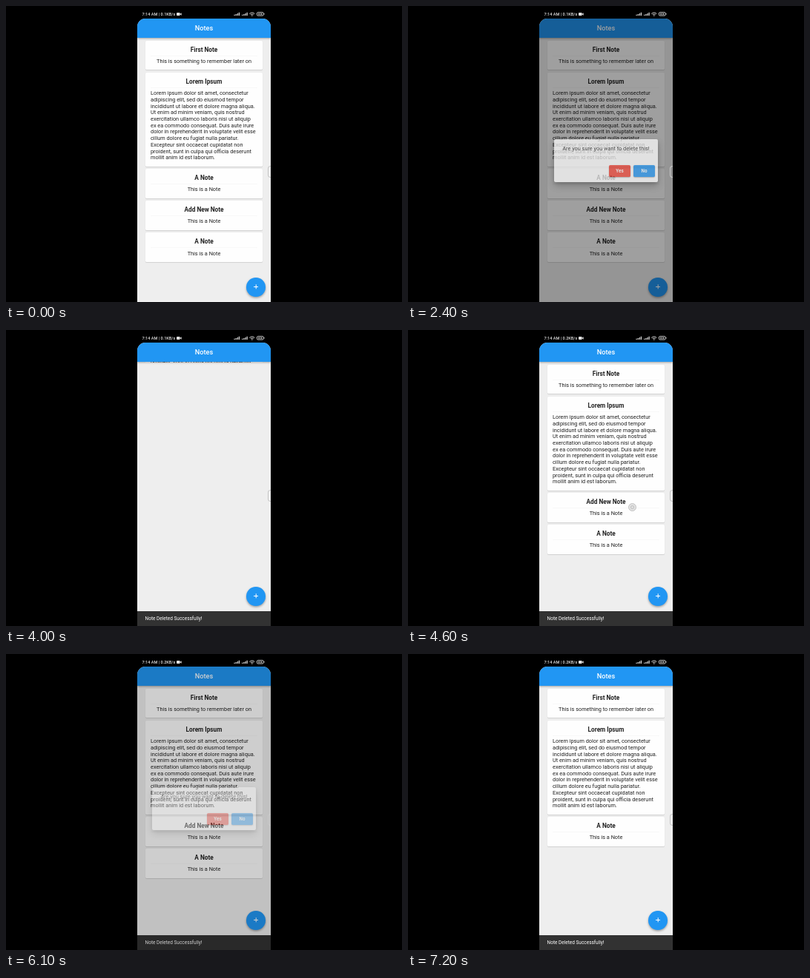
An HTML page that plays this animation: 534 px wide and 400 px high, repeating every 7900 ms.

```html
<!DOCTYPE html>
<html lang="en">
<head>
<meta charset="utf-8">
<title>Notes</title>
<style>
  html, body { margin: 0; width: 100%; height: 100%; overflow: hidden; background: #000; }
  body { position: relative; font: 7.33px/8.7px Roboto, sans-serif; color: #212121; white-space: nowrap; }
  body * { box-sizing: border-box; }
  .abs, .phone > *, .popup > *, .dot { position: absolute; }

  /* Every animation shares one 7900 ms loop */
  .list, .snack, .snack span, .fab, .fade, .dot, .before, .after, .gone { animation: 7900ms linear infinite; }

  .status { left: 183.5px; top: 7.2px; display: flex; white-space: pre; font-size: 5.55px; line-height: 8px; font-weight: 500; color: #e4e4e4; }
  .before { animation-name: before; }
  .after { position: absolute; right: 0; animation-name: after; }
  .icons { left: 0; top: 0; }

  .phone { position: absolute; left: 177px; top: 17px; width: 180px; height: 383px; overflow: hidden; border-radius: 11px 11px 0 0; background: #eee; }
  .bar { left: 0; top: 0; width: 180px; height: 26px; background: #2196f3; box-shadow: 0 1px 2.5px rgba(0,0,0,.32); color: #fff; font: 500 9.17px/26.4px Roboto, sans-serif; text-align: center; }

  .list { left: 0; top: 26px; width: 180px; overflow: hidden; display: flex; flex-direction: column; justify-content: center; animation-name: fold; }
  .cards { flex: none; padding-top: 4px; }
  .card { position: relative; width: 158px; margin: 0 0 3.65px 11px; padding: 7.5px 7px 6.6px; background: #fefefe; border-radius: 1.5px; box-shadow: 0 .4px .9px rgba(0,0,0,.22); text-align: center; }
  .card h2 { margin: 0; height: 16.65px; font: 700 8.25px/9.6px Roboto, sans-serif; }
  .card::after { content: ""; position: absolute; left: 7px; right: 7px; top: 20px; height: 1px; background: #f8f8f8; }
  .card p { margin: 0; }
  .card .long { text-align: left; }
  .gone { overflow: hidden; }
  .first { animation-name: drop-first; }
  .second { animation-name: drop-second; }

  .snack { left: 0; top: 363px; width: 180px; height: 20px; padding-left: 10.6px; background: #323232; color: #fff; font-size: 6.48px; line-height: 20.8px; animation-name: rise; }
  .snack span { animation-name: snack-text; }
  .fab { left: 147.2px; top: 330.2px; width: 25.6px; height: 25.6px; border-radius: 50%; background: #2196f3; box-shadow: 0 1.5px 3px rgba(0,0,0,.34); animation-name: rise; }
  .fab::before, .fab::after { content: ""; position: absolute; left: 9.6px; top: 12.3px; width: 6.4px; height: 1px; background: #fff; }
  .fab::after { transform: rotate(90deg); }

  .fade { inset: 0; animation-name: fade; }
  .barrier { background: rgba(0,0,0,.54); }
  .dialog { left: 20px; top: 162.5px; width: 140px; height: 58.3px; border-radius: 2px; background: #fff; box-shadow: 0 5px 11px rgba(0,0,0,.3), 0 2px 4px rgba(0,0,0,.22); text-align: center; padding-top: 9.5px; }
  .btn { top: 198px; width: 29px; height: 16px; border-radius: 1.8px; color: #fff; font: 700 6.3px/16.4px Roboto, sans-serif; text-align: center; box-shadow: 0 .8px 1.5px rgba(0,0,0,.35); }
  .yes { left: 94px; background: #f44336; }
  .no { left: 127px; background: #2196f3; }

  .edge { left: 353px; top: 216px; width: 4px; height: 16px; border: 1px solid #c8c8c8; border-right: 0; border-radius: 4px 0 0 4px; }
  .dot { width: 11px; height: 11px; border-radius: 50%; background: #e2e2e2; border: 1px solid #c2c2c2; }
  .dot::after { content: ""; position: absolute; inset: 2px; border: 1px solid #bcbcbc; border-radius: 50%; }
  .press1 { left: 303px; top: 244px; animation-name: press1; }
  .press2 { left: 297px; top: 234px; animation-name: press2; }

  @keyframes before { 0%, 51.89% { opacity: 1 } 51.9%, 100% { opacity: 0 } }
  @keyframes after { 0%, 51.89% { opacity: 0 } 51.9%, 100% { opacity: 1 } }

  @keyframes fold {
    0%, 44.94% { height: 306.5px; animation-timing-function: cubic-bezier(.4,0,.2,1) }
    51.01% { height: 0; animation-timing-function: cubic-bezier(.4,0,.2,1) }
    54.43%, 81.65% { height: 263.4px; animation-timing-function: cubic-bezier(.4,0,.2,1) }
    87.34% { height: 0; animation-timing-function: cubic-bezier(.4,0,.2,1) }
    91.14%, 100% { height: 220.3px }
  }
  @keyframes drop-first {
    0%, 51% { height: 39.45px; margin-bottom: 3.65px; padding-block: 7.5px 6.6px; visibility: visible }
    51.01%, 100% { height: 0; margin-bottom: 0; padding-block: 0; visibility: hidden }
  }
  @keyframes drop-second {
    0%, 87.33% { height: 39.45px; margin-bottom: 3.65px; padding-block: 7.5px 6.6px; visibility: visible }
    87.34%, 100% { height: 0; margin-bottom: 0; padding-block: 0; visibility: hidden }
  }
  @keyframes rise {
    0%, 31.01% { transform: translateY(20px); animation-timing-function: cubic-bezier(.4,0,.2,1) }
    34.18%, 84.18% { transform: none; animation-timing-function: cubic-bezier(.8,0,.6,1) }
    87.34% { transform: translateY(20px); animation-timing-function: cubic-bezier(.4,0,.2,1) }
    90.51%, 100% { transform: none }
  }
  @keyframes snack-text {
    0%, 32.91% { opacity: 0 }
    35.2%, 84.18% { opacity: 1 }
    87.34%, 88.9% { opacity: 0 }
    90.8%, 100% { opacity: 1 }
  }
  @keyframes fade {
    0%, 15.57% { opacity: 0 }
    16.46% { opacity: .97 }
    17.72%, 29.75% { opacity: 1 }
    30.38% { opacity: .7 }
    31.65% { opacity: .2 }
    32.66%, 64.81% { opacity: 0 }
    65.82% { opacity: .85 }
    67.09%, 75.7% { opacity: 1 }
    77.22% { opacity: .35 }
    78.48% { opacity: .06 }
    79.11%, 100% { opacity: 0 }
  }
  @keyframes press1 {
    0%, 6.32% { opacity: 0 }
    6.33%, 20.89% { opacity: 1 }
    25.32%, 100% { opacity: 0 }
  }
  @keyframes press2 {
    0%, 58.22% { opacity: 0 }
    58.23%, 65.82% { opacity: 1 }
    69.62%, 100% { opacity: 0 }
  }
</style>
</head>
<body>
  <div class="abs status">7:14 AM | <span class="before">0.1KB/s</span><span class="after">0.2KB/s</span></div>
  <svg class="abs icons" width="534" height="17" fill="#e4e4e4">
    <rect x="230" y="9" width="4.6" height="4" rx=".8"/>
    <path d="M234.3 11 236.6 9.3V12.8z"/>
    <g id="signal">
      <path d="M307.5 11.8h1.2v1.2h-1.2zM309.6 11h1.2v2h-1.2zM311.7 10h1.2v3h-1.2zM313.8 8.8h1.2v4.2h-1.2z"/>
    </g>
    <use href="#signal" x="10.7"/>
    <g fill="none" stroke="#e4e4e4" stroke-width=".9">
      <path d="M328.3 10.3q3.5-3 7 0M329.8 11.8q2-1.7 4 0"/>
      <rect x="338.5" y="8.6" width="8.6" height="4.4" rx="1.2"/>
    </g>
    <circle cx="331.8" cy="13" r=".7"/>
    <path d="M347.7 10h.8v1.6h-.8zM340.2 10h2v1.6h-2zM343.2 10h2v1.6h-2z"/>
  </svg>

  <main class="phone">
    <div class="list"><div class="cards">
      <section class="card"><h2>First Note</h2><p>This is something to remember later on</p></section>
      <section class="card"><h2>Lorem Ipsum</h2><p class="long">Lorem ipsum dolor sit amet, consectetur<br>adipiscing elit, sed do eiusmod tempor<br>incididunt ut labore et dolore magna aliqua.<br>Ut enim ad minim veniam, quis nostrud<br>exercitation ullamco laboris nisi ut aliquip<br>ex ea commodo consequat. Duis aute irure<br>dolor in reprehenderit in voluptate velit esse<br>cillum dolore eu fugiat nulla pariatur.<br>Excepteur sint occaecat cupidatat non<br>proident, sunt in culpa qui officia deserunt<br>mollit anim id est laborum.</p></section>
      <section class="card gone first"><h2>A Note</h2><p>This is a Note</p></section>
      <section class="card gone second"><h2>Add New Note</h2><p>This is a Note</p></section>
      <section class="card"><h2>A Note</h2><p>This is a Note</p></section>
    </div></div>
    <header class="bar">Notes</header>
    <div class="snack"><span>Note Deleted Successfully!</span></div>
    <div class="fab"></div>
    <div class="fade barrier"></div>
    <div class="fade popup">
      <div class="dialog">Are you sure you want to delete this!</div>
      <div class="btn yes">Yes</div>
      <div class="btn no">No</div>
    </div>
  </main>

  <div class="abs edge"></div>
  <div class="dot press1"></div>
  <div class="dot press2"></div>
</body>
</html>
```
